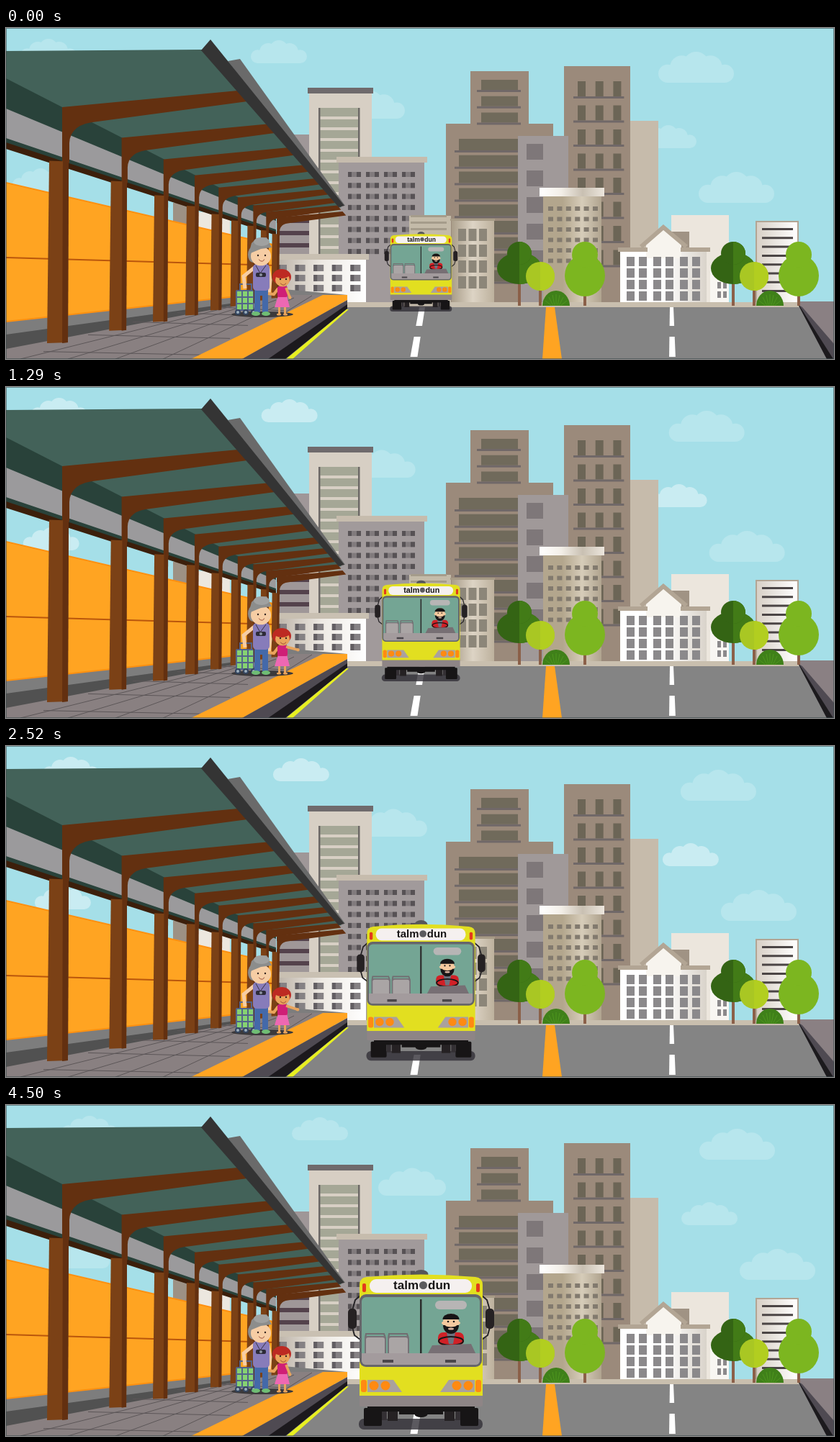
An HTML page with a canvas for the animation above (5.5 s loop, 1150 px wide and 460 px high).

```html
<!DOCTYPE html>
<html lang="en">
<head>
<meta charset="utf-8">
<style>
html, body { margin: 0; overflow: hidden; }
canvas { display: block; }
</style>
</head>
<body>
<canvas id="stage" width="1150" height="460"></canvas>
<script>
const W = 1150, H = 460, LOOP = 5500, END = 4500, GROUND = 382, PI = Math.PI;
const stage = document.getElementById('stage');
let g = stage.getContext('2d');

const rect = (c, x, y, w, h, r = 0) => {
  g.fillStyle = c; g.beginPath(); g.roundRect(x, y, w, h, r); g.fill();
};
const oval = (c, x, y, rx, ry = rx, from = 0, to = 2 * PI) => {
  g.fillStyle = c; g.beginPath(); g.ellipse(x, y, rx, ry, 0, from, to); g.fill();
};
const trace = p => {
  g.beginPath();
  for (let i = 0; i < p.length; i += 2) g.lineTo(p[i], p[i + 1]);
};
const poly = (c, ...p) => { trace(p); g.fillStyle = c; g.fill(); };
const line = (c, w, ...p) => { trace(p); g.strokeStyle = c; g.lineWidth = w; g.stroke(); };
const fade = (x, w, ...colors) => {
  const f = g.createLinearGradient(x, 0, x + w, 0);
  colors.forEach((c, i) => f.addColorStop(i / (colors.length - 1), c));
  return f;
};
const grid = (c, x, y, cols, rows, dx, dy, w, h) => {
  for (let i = 0; i < cols; i++)
    for (let j = 0; j < rows; j++) rect(c, x + i * dx, y + j * dy, w, h);
};
const block = (x, y, w, ...colors) =>
  rect(colors[1] ? fade(x, w, ...colors) : colors[0], x, y, w, GROUND - y);
const both = (axis, draw) => {
  draw();
  g.save(); g.translate(2 * axis, 0); g.scale(-1, 1); draw(); g.restore();
};
const clamp = v => Math.min(1, Math.max(0, v));
const ease = u => (1 - Math.cos(PI * clamp(u))) / 2;
const mix = (a, b, u) => a + (b - a) * u;

// floors of a brown tower: windows with a ledge below each row
function floors(c, x, y, cols, rows, dx, dy, w, h) {
  grid(c, x, y, cols, rows, dx, dy, w, h);
  grid('#706868', x - 6, y + h, 1, rows, 0, dy, (cols - 1) * dx + w + 10, 3);
}

function towers() {
  const tan = '#9b8a7b', pane = '#706a5b';
  block(376, 148, 46, '#9f9798');
  grid('#54424c', 376, 265, 1, 3, 0, 17, 46, 6);
  block(421, 90, 87, '#d7cfc4');
  rect('#6f6a6c', 419, 83, 91, 8);
  rect('#a5a796', 435, 111, 56, 206);
  grid('#d7cfc4', 435, 123, 1, 13, 0, 15, 56, 4);
  grid('#6c6866', 434, 111, 2, 1, 55, 0, 2.5, 206);

  block(462, 186, 119, '#a19a9b');
  rect('#c6bcad', 459, 179, 126, 8);
  grid('#817b7d', 475, 200, 4, 8, 25, 15.3, 18, 7);
  grid('#575255', 475, 200, 4, 8, 25, 15.3, 5, 7);
  grid('#575255', 487, 200, 4, 8, 25, 15.3, 6, 7);

  block(866, 129, 40, '#c6bbab');
  block(645, 60, 81, tan);
  block(611, 133, 149, tan);
  floors(pane, 660, 72, 1, 3, 0, 22.7, 51, 14);
  floors(pane, 629, 154, 1, 9, 0, 22.8, 82, 16);
  block(775, 53, 92, tan);
  floors('#6c6556', 794, 74, 3, 8, 24.7, 33.5, 11, 21);
  block(711, 150, 70, '#a09999');
  grid('#7e7779', 723, 161, 1, 5, 0, 37, 23, 22);

  block(746, 233, 81, '#b3a68d', '#b3a68d', '#d6ccb9', '#b0a48f');
  grid('#827a6e', 753, 248, 6, 6, 12.4, 14.5, 7, 6);
  rect(fade(741, 90, '#fff', '#f3efe8', '#c9c0b2', '#ece6dd'), 741, 222, 90, 12);

  block(560, 261, 58, '#c4bba9');
  grid('#a59c8b', 562, 260, 1, 3, 0, 9, 50, 3);
  block(619, 267, 59, '#a99d89', '#ddd4c5', '#bdb19d');
  rect('#a79b86', 617, 265, 62, 3);
  grid('#8c8679', 628, 279, 3, 4, 14.5, 22, 11, 17);
}

function lowHouses() {
  const trim = '#b2a594', glass = '#8b898b';
  block(378, 321, 122, '#bdb4a9', '#eeeae4', '#fff');
  rect('#c9c0b2', 376, 314, 128, 8);
  grid('#858184', 376, 329, 5, 3, 25.6, 14, 14, 9);
  grid('#625e62', 376, 329, 5, 3, 25.6, 14, 5, 9);

  block(924, 260, 80, '#ece6dd');
  block(978, 334, 26, '#f8f6f2');
  grid(glass, 988, 340, 2, 3, 8, 13, 5, 9);
  rect('#a09384', 921, 283, 28, 23);
  block(853, 310, 120, '#fff', '#fff', '#d9d3ca');
  poly('#f7f4ee', 889, 320, 889, 301, 913, 279, 938, 301, 938, 320);
  grid(trim, 850, 305, 2, 1, 87, 0, 41, 6);
  line(trim, 6, 882, 304, 913, 277, 945, 304);
  for (let i = 0; i < 3; i++) grid(glass, 862 + i * 37, 318, 2, 4, 17, 16, 11, 13);

  block(1041, 268, 60, trim);
  block(1043, 270, 56, '#d8d0c6', '#fff');
  grid('#4b4545', 1050, 278, 1, 8, 0, 12.3, 43, 3);
}

function trees(x) {
  const crown = (left, right, x, y, rx, ry) => {
    oval(left, x, y, rx, ry);
    oval(right, x, y, rx, ry, -PI / 2, PI / 2);
  };
  const trunk = (x, y) => rect('#8b6049', x - 2, y, 4, 386 - y);
  g.save(); g.translate(x, 0);
  trunk(0, 340); trunk(29, 355); trunk(91, 360);
  for (const [y, rx, ry] of [[334, 31, 22], [313, 17, 16]])
    crown('#346414', '#427b17', 0, y, rx, ry);
  crown('#a9c723', '#b2ce20', 29, 345, 20, 20);
  oval('#7cb620', 91, 344, 28, 29); oval('#7cb620', 91, 315, 18);
  oval('#3f8019', 51, 386, 19, 21, PI, 2 * PI);
  for (let i = -3; i < 4; i++) line('#4f961f', 1, 51 + i * 2, 386, 51 + i * 5, 370 + i * i);
  g.restore();
}

// road marking running from the far edge (x0, w0) to the near edge (x1, w1)
function lane(color, x0, w0, x1, w1, spans) {
  for (const [a, b] of spans) {
    const at = y => mix(x0, x1, (y - 388) / 72), wide = y => mix(w0, w1, (y - 388) / 72);
    poly(color, at(a), a, at(a) + wide(a), a, at(b) + wide(b), b, at(b), b);
  }
}

function road() {
  const dashes = [[388, 414], [429, 457]];
  rect('#848484', 300, 388, 850, 72);
  rect('#c9bfae', 474, 381, 628, 7);
  poly('#8a8083', 1100, 380, 1150, 380, 1150, 460, 1140, 460);
  poly('#4f4a52', 1100, 384, 1106, 388, 1150, 439, 1150, 460, 1140, 460);
  poly('#1c1a1d', 1100, 384, 1102, 386, 1149, 460, 1140, 460);
  lane('#fff', 574, 8, 561, 10, dashes);
  lane('#fff', 922, 5, 921, 9, dashes);
  lane('#ffa422', 750, 12, 745, 27, [[388, 460]]);
}

function platform() {
  rect('#9d9184', 232, 243, 19, 140);
  rect('#ece7df', 263, 256, 48, 120);
  poly('#7d7d7d', 0, 404, 375, 362, 474, 371, 330, 392, 0, 440);
  poly('#ffa422', 0, 215, 375, 302, 375, 367, 0, 408);
  line('#ff9010', 2, 0, 215, 375, 302); line('#ff9010', 2, 0, 408, 375, 367);
  line('#b9560c', 2, 0, 319, 375, 330);
  poly('#515151', 0, 426, 318, 382, 340, 383, 0, 447);
  poly('#898081', 0, 446, 325, 384, 380, 371, 474, 371, 330, 460, 0, 460);
  for (let i = 0; i < 5; i++) {
    const y = 388 + i * i * 2.6 + i * 5;
    line('#5c5658', 1, 20 + i * 66, 460, 325 + i * 25, 384 - i * 3);
    line('#5c5658', 1, 300 - i * 62, y, 386 - i * 25, y + 5);
  }
  poly('#ffa422', 257, 460, 440, 371, 474, 371, 474, 378, 328, 460);
  poly('#4f4a52', 328, 460, 474, 378, 474, 389, 386, 460);
  poly('#1c191d', 364, 460, 474, 384, 474, 390, 388, 460);
  poly('#e8f020', 389, 460, 473, 391, 476, 391, 398, 460);
}

// nine equal bays in perspective; near is 1 at the first post
function shelter() {
  poly('#6a6a6a', 308, 46, 325, 43, 446, 212, 471, 247, 462, 247);
  poly('#436259', 0, 32, 272, 30, 466, 249, 375, 264, 0, 130);
  poly('#29423a', 0, 70, 375, 262, 375, 276, 0, 126);
  poly('#9b9a9c', 0, 112, 375, 268, 375, 280, 0, 155);
  poly('#29423a', 0, 153, 375, 280, 375, 284, 0, 160);
  poly('#3c1f0b', 0, 159, 375, 283, 375, 288, 0, 168);
  for (let bay = 0; bay < 9; bay++) {
    const near = 1 / (1 + .21 * bay);
    const px = d => 554 - d * near, py = d => 355 - d * near;
    const x = px(476), y = py(245), left = px(497), right = px(467);
    const top = 166 + .325 * left, foot = 449.4 - .2 * left;
    g.fillStyle = '#633010';
    g.beginPath();
    g.moveTo(x, y); g.lineTo(px(232), py(268)); g.lineTo(px(219), py(253));
    g.lineTo(px(427), py(225));
    g.quadraticCurveTo(px(465), py(222), px(466), py(195));
    g.lineTo(px(466), top + 3); g.lineTo(x, top + 3);
    g.fill();
    poly('#7b4116', left + 3 * near, top, right, top + 1, right - 1, foot - 1, left, foot);
    poly('#633010', px(475), top, right, top + 1, right - 1, foot - 1, px(476), foot);
  }
  poly('#343434', 284, 16, 470, 247, 462, 249, 271, 31);
}

function face(skin, x, y, r, gap) {
  oval(skin, x, y, r, r * .95);
  oval('#322320', x - gap + 1, y - 1, 1.2); oval('#322320', x + gap + 1, y - 1, 1.2);
  g.strokeStyle = '#9a4c38'; g.lineWidth = 1;
  g.beginPath(); g.arc(x + 1, y + 3, 4, .4, PI - .4); g.stroke();
}

function woman() {
  const skin = '#f6cda4', hair = '#8c8d8c', frame = '#53648a', shoe = '#6fbd74';
  oval('#3b393b', 356, 398, 43, 4);
  rect(frame, 319, 364, 25, 29, 2);
  grid('#86d272', 321, 366, 3, 3, 8, 9, 6, 7);
  line(frame, 2, 325, 364, 325, 356, 341, 356, 341, 364);
  for (let x = 322; x < 345; x += 11) { oval('#34455f', x, 395, 4); oval('#9baebd', x, 395, 2); }
  line(skin, 5, 345, 333, 330, 345, 332, 362);
  line(skin, 5, 364, 334, 367, 350, 365, 369);
  rect('#4469a9', 345, 360, 8, 35); rect('#4469a9', 356, 360, 8, 35);
  rect('#4469a9', 345, 360, 19, 12);
  rect('#877cba', 343, 328, 23, 37, 5);
  oval(shoe, 347, 397, 6, 3); oval(shoe, 361, 397, 6, 3);
  oval(hair, 343, 315, 7, 11);
  face(skin, 354, 317, 14, 5);
  poly(hair, 337, 314, 341, 299, 348, 292, 362, 291, 369, 305, 354, 307);
  oval('#a0a1a0', 355, 297, 11, 6);
  line('#38323f', 1, 347, 330, 353, 341, 361, 330);
  rect('#2d2b38', 347, 340, 14, 6, 2); oval('#8b92a0', 354, 343, 2);
}

function girl() {
  const skin = '#e9a45c', hair = '#bd2a22';
  line(skin, 4, 378, 362, 372, 370, 364, 369);
  both(383.5, () => { rect(skin, 378, 385, 3, 13); oval(skin, 379, 398, 3, 1.5); });
  poly('#ee68b3', 378, 372, 390, 372, 394, 388, 373, 388);
  rect('#cf1f76', 377, 359, 14, 15, 2);
  oval(hair, 383, 346, 13, 11);
  face(skin, 384, 350, 10, 4);
  oval(hair, 383, 342, 11, 6);
}

function wave(t) {
  const angle = 1.3 - 1.05 * (ease(t / 750) - ease((t - 2300) / 1200));
  const x = 390 + 16 * Math.cos(angle), y = 362 + 13 * Math.sin(angle);
  line('#e9a45c', 3.5, 389, 361, x, y);
  oval('#e9a45c', x, y, 2.2);
}

function driver() {
  const black = '#171516', skin = '#f6ca9f', x = 618;
  rect('#d02127', x - 18, 316, 36, 18, 7);
  poly('#6c737f', x - 6, 316, x + 6, 316, x + 3, 332, x - 3, 332);
  oval(skin, x, 303, 13, 4);
  oval(skin, x, 302, 11, 12);
  oval(black, x, 298, 11.5, 8, PI, 2 * PI);
  oval(black, x, 306, 11, 12, 0, PI);
  oval(skin, x, 306, 8, 2.5);
  oval('#d9b3a0', x, 311, 4, 1.5);
  oval(black, x - 4, 301, 1.3); oval(black, x + 4, 301, 1.3);
  g.strokeStyle = black; g.lineWidth = 2;
  g.beginPath(); g.ellipse(x, 328, 17, 6, 0, 0, 2 * PI); g.stroke();
}

function bus(scale, lamp) {
  const black = '#171516', yellow = '#e2df20', mid = 576.5;
  g.save();
  g.translate(mid, 337); g.scale(scale, scale); g.translate(-mid, -337);
  rect('rgba(51,48,55,.8)', 490, 436, 172, 15, 7);
  oval('#57575b', mid, 235, 10, 6);
  both(mid, () => {
    line('#252326', 2, 493, 264, 485, 271, 481, 285);
    line('#252326', 2, 481, 309, 484, 320, 492, 326);
    rect('#252123', 475, 283, 12, 28, 5);
    rect(black, 497, 421, 25, 25, 2);
    rect('#343034', 522, 423, 7, 15); rect('#252123', 530, 423, 14, 16);
  });
  rect(black, 502, 418, 149, 8); rect(black, 546, 422, 61, 8);
  oval(black, mid, 430, 9, 4);
  rect('#8e8586', 491, 400, 171, 19, 2);
  g.fillStyle = yellow;
  g.beginPath();
  g.moveTo(491, 404); g.lineTo(491, 250);
  g.quadraticCurveTo(491, 240, 501, 239);
  g.quadraticCurveTo(mid, 232, 652, 239);
  g.quadraticCurveTo(662, 240, 662, 250);
  g.lineTo(662, 404); g.fill();

  rect('#f5f0ef', 505, 242, 142, 19, 9);
  g.fillStyle = black;
  g.font = 'bold 17px "Liberation Sans", Arial, sans-serif';
  g.textAlign = 'right'; g.fillText('talm', 573, 256);
  g.textAlign = 'left'; g.fillText('dun', 586, 256);
  oval('#5b5a5d', 579.5, 250.5, 5.5);

  rect('#66656a', 491, 263, 170, 101, 9);
  rect('#74a594', 494, 267, 164, 94, 6);
  for (const x of [498, 530]) {
    line('#716c70', 2, x + 1, 324, x + 2, 318, x + 27, 318, x + 29, 324);
    rect('#767176', x, 321, 30, 27, 4);
    rect('#aaa5a5', x + 2, 323, 26, 25, 3);
  }
  rect('#2b2c2c', 575, 270, 2.5, 76);
  rect('#b7b5b5', 596, 272, 44, 12, 6);
  driver();
  poly('#776f74', 585, 347, 592, 334, 646, 332, 653, 347);
  rect('#a39b9d', 494, 345, 164, 16, [0, 0, 6, 6]);
  grid('#4a464a', 523, 354, 2, 1, 87, 0, 15, 4);
  both(mid, () => {
    rect('#e33a1c', 495, 248, 5, 12, 2);
    poly('#aaa19d', 502, 382, 538, 382, 550, 399, 502, 399);
    oval('#ff8a12', 511, 390, 6.5); oval('#ff8a12', 527, 390, 6.5);
    rect(lamp, 493, 382, 8, 17, 3);
  });
  g.restore();
}

function cloud(x, base, w, alpha) {
  g.fillStyle = `rgba(255,255,255,${alpha})`;
  g.beginPath();
  for (let i = 0; i < 5; i++) {
    const rise = Math.sin(PI * i / 4), r = (.12 + .05 * rise) * w;
    const cx = x + (.12 + .19 * i) * w, cy = base - (.12 + .12 * rise) * w;
    g.moveTo(cx + r, cy);
    g.arc(cx, cy, r, 0, 2 * PI);
  }
  g.rect(x + .12 * w, base - .2 * w, .76 * w, .2 * w);
  g.fill();
}

const smallClouds = [[20, 47], [340, 49], [881, 167], [9, 227]];
const largeClouds = [[460, 126], [906, 76], [962, 243]];

function sky(t) {
  rect('#a5dfe8', 0, 0, W, H);
  const drift = .0132 * (t < 360 ? t * t / 720 : t - 180);
  const glow = .2 * clamp(Math.min(t / 800, (END - t) / 900));
  for (const [x, y] of smallClouds) cloud(x + drift, y, 78, .2 + glow);
  for (const [x, y] of largeClouds) cloud(x + drift, y, y === 126 ? 94 : 105, .2);
}

// static scenery is painted once
const screen = g, scenery = document.createElement('canvas');
scenery.width = W; scenery.height = H;
g = scenery.getContext('2d');
towers(); lowHouses(); road();
trees(713); trees(1010);
platform(); shelter();
woman(); girl();
g = screen;

function frame() {
  const t = Math.min(performance.now() % LOOP, END);
  sky(t);
  g.drawImage(scenery, 0, 0);
  wave(t);
  const red = Math.floor((t + 700) / 800) % 2;
  bus(.5 + .5 * ease(t / 3750), red ? '#e8361a' : '#ff8a12');
  g.strokeStyle = 'rgba(60,75,78,.6)'; g.lineWidth = 1;
  g.strokeRect(.5, .5, W - 1, H - 1);
  requestAnimationFrame(frame);
}
frame();
</script>
</body>
</html>
```
